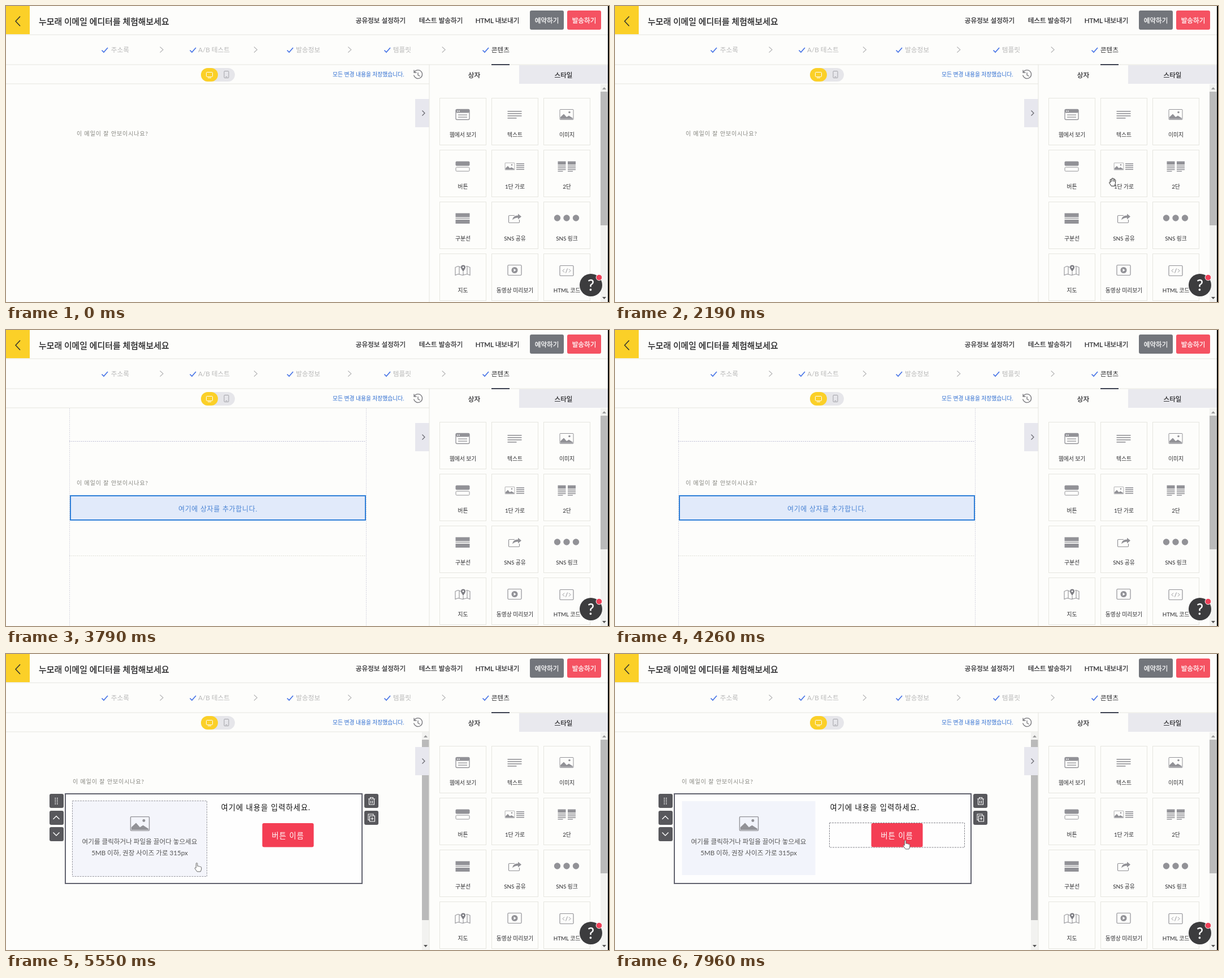
An HTML page for the animation above (8 s loop, 1067 px wide and 525 px high).

```html
<!DOCTYPE html>
<html lang="ko">
<head>
<meta charset="utf-8">
<style>
html, body { margin: 0; width: 100%; height: 100%; overflow: hidden; background: #fdfdfb; }
svg { display: block; font-family: Lato, 'Noto Sans CJK KR', 'Noto Sans CJK', sans-serif; }
</style>
</head>
<body>
<svg id="stage" width="1067" height="525" viewBox="0 0 1067 525"></svg>
<script>
const GRAY = '#929297', DARK = '#2b2b2e', LINE = '#e6e6e0';
const rect = (x, y, w, h, fill, more = '') =>
  `<rect x="${x}" y="${y}" width="${w}" height="${h}" fill="${fill}" ${more}/>`;
const frame = (x, y, w, h, stroke, more = '') => rect(x, y, w, h, 'none', `stroke="${stroke}" ${more}`);
const path = (d, stroke, width = 1, more = '') =>
  `<path d="${d}" fill="none" stroke="${stroke}" stroke-width="${width}" ${more}/>`;
const fillPath = (d, fill) => `<path d="${d}" fill="${fill}"/>`;
const circle = (x, y, r, fill, more = '') => `<circle cx="${x}" cy="${y}" r="${r}" fill="${fill}" ${more}/>`;
// y is the vertical middle of the line
const text = (x, y, size, str, fill = DARK, more = 'text-anchor="middle"') =>
  `<text x="${x}" y="${y + size * 0.37}" font-size="${size}" fill="${fill}" ${more}>${str}</text>`;
const group = (id, body) => `<g id="${id}">${body}</g>`;
// a thin outline gives the medium weight
const medium = color => `stroke="${color}" stroke-width=".25"`;
const label = (x, y, str, fill = DARK) => text(x, y, 11.6, str, fill, 'text-anchor="middle" ' + medium(fill));

function picture(x, y, s = 1) {
  return `<g transform="translate(${x} ${y}) scale(${s})">` +
    frame(-12, -9, 24, 18, GRAY, 'rx="1" stroke-width="1"') +
    fillPath('M-11 8V4.500l6-5.500 5 5.500 4-2.500 7 4.500v1.500z', GRAY) + circle(5, -4, 1.8, GRAY) + '</g>';
}
const lines = (x, y, w, n, step, h = 1.6) =>
  Array.from({ length: n }, (_, i) => rect(x, y + i * step, w, h, GRAY)).join('');

function scrollbar(x, thumbEnd) {
  return rect(x, 139, 13, 386, '#f2f2f0') + rect(x, 152, 12.5, thumbEnd - 152, '#bababa') +
    fillPath(`M${x + 3} 148h7l-3.5-4z`, '#999') + fillPath(`M${x + 3} 516h7l-3.5 4z`, '#555');
}

function header() {
  let s = rect(0, 0, 42, 50, '#fbd028') + path('M25 18.500l-8 8.500 8 8.500', DARK, 1.4) +
    text(58, 27, 14.9, '누모래 이메일 에디터를 체험해보세요', '#1c1c1e', medium('#1c1c1e'));
  [[663, '공유정보 설정하기'], [769.5, '테스트 발송하기'], [869.5, 'HTML 내보내기']]
    .forEach(([x, t]) => s += label(x, 25.5, t));
  [[927, '예약하기', '#72757b'], [993, '발송하기', '#f55262']]
    .forEach(([x, t, c]) => s += rect(x, 8, 60, 34, c, 'rx="3"') + label(x + 30, 25.5, t, '#fff'));
  s += rect(0, 50.5, 1065, 1, LINE) + rect(0, 103.5, 1065, 1, LINE);
  [[169, 202, '주소록'], [325, 368, 'A/B 테스트'], [497, 534.5, '발송정보'], [669, 701, '템플릿'], [843, 875, '콘텐츠']]
    .forEach(([x, tx, t], i) => {
      s += path(`M${x + 0.5} 78.500l3.500 3.500 7-8`, '#4673e6', 1.7) + text(tx, 78, 11.7, t, i < 4 ? '#b9b9b9' : DARK);
      if (i < 4) s += path(`M${272.5 + i * 166.4} 72.500l5.500 5-5.500 5`, '#b5b5b5', 1.1);
    });
  return s + rect(859, 103, 32, 2, '#3d4150');
}

function toolbar() {
  return rect(345, 110, 60, 24, '#e6e6ea', 'rx="12"') + rect(345, 110, 30, 24, '#fbd028', 'rx="12"') +
    frame(354.5, 117.5, 11, 8, '#fff', 'rx="1"') + path('M357 127.500h6', '#fff') +
    frame(386, 115.5, 8, 12, '#a2a2a8', 'rx="1"') + path('M388.500 125.500h3', '#a2a2a8') +
    text(704.5, 121.5, 9.75, '모든 변경 내용을 저장했습니다.', '#2c6cd0', 'text-anchor="end"') +
    path('M722.500 117.500a7.500 7.500 0 1 1-.8 5', '#77777c', 1.3) +
    path('M722 113.500v4.500h4.500M729 118v4.500l3.500 2', '#77777c', 1.3) +
    rect(0, 137.5, 749, 1, LINE);
}

const icons = [
  (x, y) => frame(x - 12, y - 9, 24, 18, GRAY, 'rx="2" stroke-width="1.3"') + rect(x - 12, y - 9, 24, 6, GRAY, 'rx="2"') +
    circle(x - 9, y - 6, 1, '#fff') + circle(x - 6, y - 6, 1, '#fff') + lines(x - 8, y, 16, 2, 4, 1.3),
  (x, y) => lines(x - 12.5, y - 6.5, 25, 3, 4) + rect(x - 12.5, y + 5.5, 16, 1.6, GRAY),
  (x, y) => picture(x, y),
  (x, y) => rect(x - 12.5, y - 9, 25, 8, GRAY, 'rx="2"') + frame(x - 12, y + 1.5, 24, 7, GRAY, 'rx="1.5"'),
  (x, y) => picture(x - 8.5, y, 0.7) + lines(x + 3, y - 5.5, 14, 4, 3.3),
  (x, y) => [-15.5, 2].map(d => rect(x + d, y - 9, 14, 6, GRAY) + lines(x + d, y - 1.5, 14, 3, 3.2) +
    rect(x + d, y + 8, 9, 1.4, GRAY)).join(''),
  (x, y) => rect(x - 12.5, y - 9, 25, 7, GRAY) + rect(x - 12.5, y - 0.6, 25, 1.3, GRAY) + rect(x - 12.5, y + 2.5, 25, 7, GRAY),
  (x, y) => path(`M${x} ${y - 5}h-9q-1.500 0-1.500 1.500v10q0 1.500 1.500 1.500h16q1.500 0 1.500-1.500v-4`, GRAY, 1.2) +
    fillPath(`M${x - 4} ${y + 3}q1-8 10-8v-3l6 5-6 5v-3q-6 0-10 4z`, GRAY),
  (x, y) => [-16.5, 0, 16.5].map(d => circle(x + d, y - 0.5, 5.7, GRAY)).join(''),
  (x, y) => path(`M${x - 3} ${y - 5}l-5-2-5 2v14l5-2 8 2 8-2 5 2v-14l-5-2-2 .8M${x - 6} ${y - 6}v13M${x + 8} ${y - 6}v13M${x + 1} ${y + 3}v6`, GRAY, 1.1) +
    fillPath(`M${x + 1} ${y + 3}c-1-3-4-5-4-8a4 4 0 0 1 8 0c0 3-3 5-4 8z`, '#7e7e84') + circle(x + 1, y - 5, 1.4, '#fff'),
  (x, y) => frame(x - 12, y - 9, 24, 18, GRAY, 'rx="1.5" stroke-width="1.2"') + circle(x, y, 5.5, GRAY) +
    fillPath(`M${x - 1.5} ${y - 2.8}v5.600l4.200-2.800z`, '#fff'),
  (x, y) => frame(x - 12, y - 8, 24, 18, GRAY, 'rx="1.5" stroke-width="1.2"') +
    path(`M${x - 4} ${y - 2}l-3 3 3 3M${x + 4} ${y - 2}l3 3-3 3M${x + 1.5} ${y - 3}l-3 8`, GRAY)
];
const names = ['웹에서 보기', '텍스트', '이미지', '버튼', '1단 가로', '2단', '구분선', 'SNS 공유', 'SNS 링크', '지도', '동영상 미리보기', 'HTML 코드'];

function panel() {
  let s = rect(748.5, 104, 1, 421, LINE) + rect(908, 105, 157, 33, '#e9e9ee') +
    label(828.5, 122.5, '상자') + label(986.5, 122.5, '스타일');
  names.forEach((name, i) => {
    const x = 767 + i % 3 * 92, y = 163.5 + Math.floor(i / 3) * 92;
    s += frame(x + 0.5, y, 82, 83, LINE) + icons[i](x + 41, y + 29) + text(x + 41.5, y + 65, 9.8, name);
  });
  return s + scrollbar(1052, 389) + rect(1065, 0, 2, 525, '#000') +
    circle(1035, 495, 20, '#3c3c3e') + text(1035, 495, 26, '?', '#fff', 'text-anchor="middle" stroke="#fff" stroke-width=".4"') +
    circle(1049.5, 481.5, 5.3, '#ee4058', 'stroke="#fff"');
}

function dropZone() {
  const dash = 'stroke-dasharray="2 1.500"';
  return path('M112.500 139v386M637.500 139v386', '#d3d3dd', 1, dash) +
    path('M112 197.500h525', '#bcbcd4', 1, dash) + path('M112 400.500h525', '#deded6', 1, dash) +
    rect(114, 294, 522, 43, '#e1eafa', 'stroke="#2e7fd8" stroke-width="2"') +
    text(375, 317.5, 12, '여기에 상자를 추가합니다.', '#4a84d4', 'text-anchor="middle" letter-spacing=".7"');
}

function block() {
  const dash = 'stroke-dasharray="3 1.500"', wide = 'letter-spacing="1"';
  let s = scrollbar(736, 472) + rect(105, 248, 525, 159, '#fefefe', 'stroke="#62636f" stroke-width="2"') +
    rect(118.5, 261, 236, 131, '#f2f4fb') +
    group('imageHover', rect(117.5, 260.5, 238, 134, '#f4f5fb', `stroke="#9a9aa2" ${dash}`)) +
    picture(237, 301, 1.38) +
    text(236.5, 332.5, 11.6, '여기를 클릭하거나 파일을 끌어다 놓으세요', '#555') +
    text(236.5, 352.5, 11.6, '5MB 이하, 권장 사이즈 가로 315px', '#555') +
    text(380.5, 272, 13.3, '여기에 내용을 입력하세요.', '#111', wide) +
    group('buttonHover', frame(379.5, 299.5, 239, 43.5, '#85858c', dash)) +
    rect(453.5, 300, 91, 42.5, '#f43e54', 'rx="3"') +
    text(499, 322.5, 13.3, '버튼 이름', '#fff', 'text-anchor="middle" ' + wide);
  [[77, 248], [77, 278], [77, 307], [634, 248], [634, 278]]
    .forEach(([x, y]) => s += rect(x, y, 25, 25, '#58585c', 'rx="3"'));
  for (let i = 0; i < 8; i++) s += rect(86.5 + i % 2 * 3.5, 255 + (i >> 1) * 3.3, 1.6, 1.6, '#fff');
  return s + path('M83.500 293l5.500-5.500 5.500 5.500M83.500 316.500l5.500 5.500 5.500-5.500', '#fff', 1.4) +
    path('M641 257h12M644.500 257v-2.500h5v2.500M642.500 257v10h9v-10M645.500 260v5M648.500 260v5', '#fff', 1.1) +
    path('M643.500 287h9v10h-9zM643 294.500h-2v-10.500h9v2.500M648 289.500v5M645.500 292h5', '#fff', 1.1);
}

const cursors = {
  arrow: 'M-3.500-7V6L-.5 3.200 1.500 7.500 3.500 6.600 1.600 2.500H5.500Z',
  point: 'M-3.500-7c1-1 2.200-.4 2.300.8V-1.500c1-.8 2-.5 2.400.4 1-.6 1.900-.2 2.200.6 1.300-.5 2.300.1 2.300 1.300V4l-1.500 4h-6L-5.800 2.500c-.5-1.200.8-2 2-.8Z',
  grab: 'M-2.800 7-6.200 1.600c-.8-1.500.8-2.200 2-.8L-4.800-3.500c-.3-1.700 1.600-2 2-.5L-2-5.800c0-1.700 2.100-1.700 2.200 0 .6-1.200 2.300-.8 2.300.6v1.200c.8-1 2.300-.4 2.300.9l-.4 5.600L3 7Z'
};

const stage = document.getElementById('stage');
stage.innerHTML = header() + toolbar() +
  group('dropZone', dropZone()) + group('block', block()) +
  group('note', text(0, 0, 10, '이 메일이 잘 안보이시나요?', '#85857f', 'letter-spacing=".9"')) +
  rect(724, 165, 25, 50, '#e7e7ee') + path('M736.500 185.500l4.500 4.500-4.500 4.500', '#66666c', 1.2) + panel() +
  group('cursor', '<path stroke-linejoin="round" fill="#fff"/>' +
    group('fingers', path('M-2.500-4v3.500M.2-5.500v4.500M2.500-4.500v4', '#222', 0.9)));
const el = id => document.getElementById(id);
const show = (id, on) => el(id).style.display = on ? '' : 'none';
const shape = el('cursor').firstChild;

const LOOP = 8000, APPEAR = 900, DRAG = 3550, DROP = 4700;
// time, x, y
const track = [
  [900, 760, 372], [1200, 843, 327], [1500, 843, 327], [2400, 887, 310], [3600, 887, 310],
  [4700, 375, 318], [5200, 340, 378], [5900, 340, 378], [6650, 512, 358], [7300, 512, 358], [7750, 516, 338]
];
function cursorAt(t) {
  const i = track.findIndex(k => k[0] > t);
  if (i < 1) return track[i ? track.length - 1 : 0].slice(1);
  const [a, b] = [track[i - 1], track[i]];
  const u = (t - a[0]) / (b[0] - a[0]), e = u * u * (3 - 2 * u);
  return [a[1] + (b[1] - a[1]) * e, a[2] + (b[2] - a[2]) * e];
}

function draw(now) {
  const t = now % LOOP, dragging = t >= DRAG && t < DROP, dropped = t >= DROP;
  const [x, y] = cursorAt(t);
  const inside = (l, top, r, b) => x > l && x < r && y > top && y < b;
  const onImage = dropped && inside(117, 260, 356, 395);
  const onButton = dropped && inside(379, 299, 619, 343);
  const onCard = x > 767 && (x - 767) % 92 < 83;
  const kind = onImage || onButton ? 'point' : onCard ? 'grab' : 'arrow';
  show('dropZone', dragging);
  show('block', dropped);
  show('imageHover', onImage);
  show('buttonHover', onButton);
  show('cursor', t >= APPEAR && !dragging);
  show('fingers', kind === 'grab');
  el('note').setAttribute('transform', `translate(${dropped ? 118 : 125} ${dragging ? 271.5 : 226.5})`);
  el('cursor').setAttribute('transform', `translate(${x} ${y})`);
  shape.setAttribute('d', cursors[kind]);
  shape.setAttribute('stroke', kind === 'grab' ? '#222' : '#666');
  requestAnimationFrame(draw);
}
requestAnimationFrame(draw);
</script>
</body>
</html>
```
